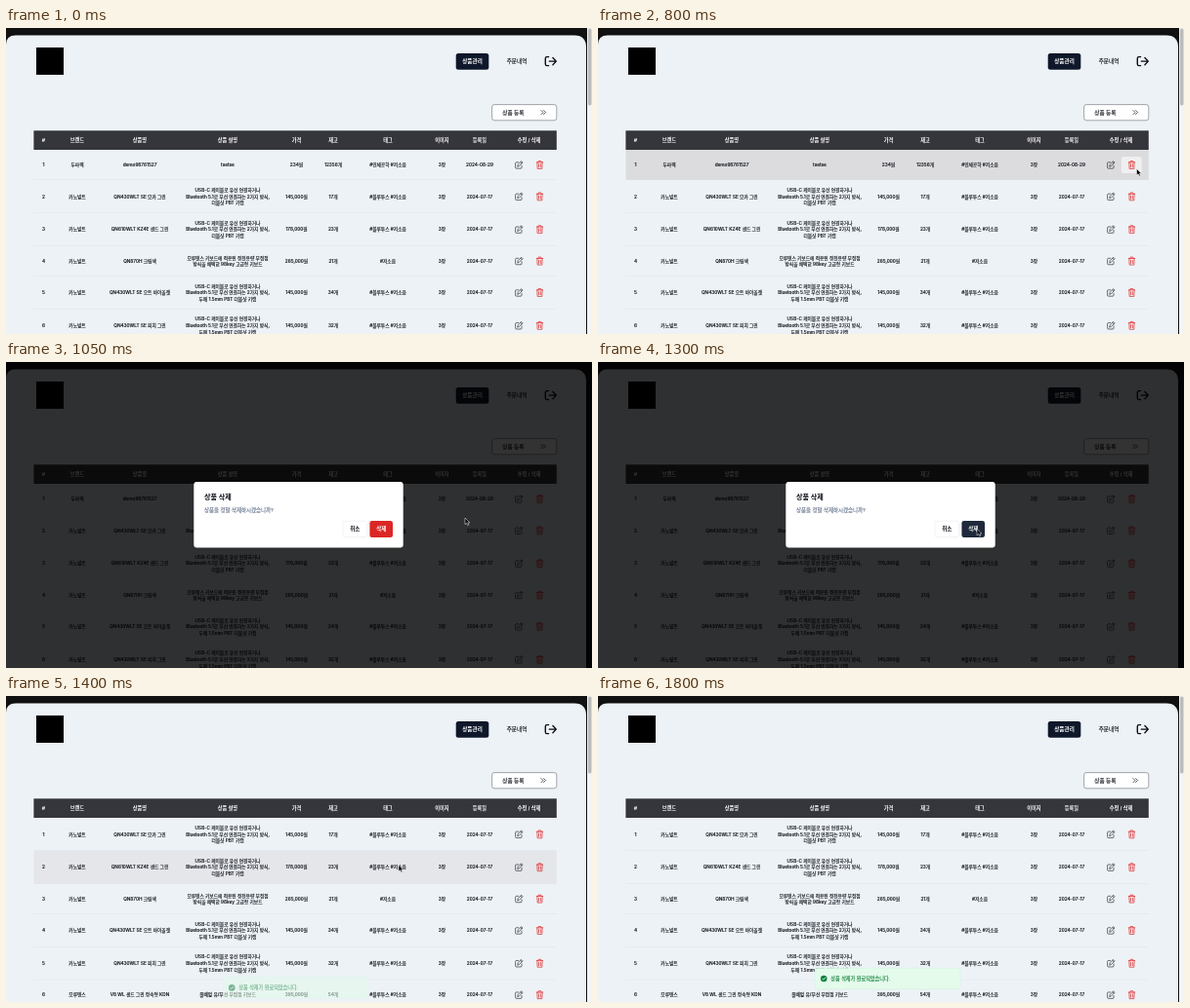
Recreate the animation shown at these times as an HTML page. Size 600 px wide and 314 px high, loop 2100 ms.

```html
<!DOCTYPE html>
<html lang="ko">
<head>
<meta charset="utf-8">
<title>상품관리</title>
<style>
  html, body { margin: 0; width: 100%; height: 100%; overflow: hidden; background: #111; }
  svg { display: block; width: 100%; height: 100%; }
  text { font-family: Inter, "Noto Sans CJK KR", "Noto Sans CJK", sans-serif; white-space: pre; }
</style>
</head>
<body>
<svg id="stage" viewBox="0 0 600 314"></svg>
<script>
const LOOP = 2100, STEP = 50, TOP = 125;
const INK = '#11151c', RED = '#dc2626', NAVY = '#0f172a';

const rect = (x, y, w, h, fill, more = '') =>
  `<rect x="${x}" y="${y}" width="${w}" height="${h}" fill="${fill}" ${more}/>`;
// A hairline stroke gives Hangul a medium weight
const text = (x, y, s, size = 4.74, fill = INK, weight = 500, anchor = 'middle') =>
  `<text x="${x}" y="${y + size * 0.37}" font-size="${size}" fill="${fill}" stroke="${fill}" stroke-width="${weight < 600 ? 0.13 : 0}" font-weight="${weight}" text-anchor="${anchor}">${s}</text>`;
const line = (d, color, width) =>
  `<path d="${d}" fill="none" stroke="${color}" stroke-width="${width}" stroke-linecap="round" stroke-linejoin="round"/>`;
const icon = (x, y, scale, d, color, width) =>
  `<g transform="translate(${x} ${y}) scale(${scale})">${line(d, color, width)}</g>`;

const editIcon = (x, y) => icon(x, y, 0.92,
  'M-.3-3H-2.6Q-3.7-3-3.7-1.9V2.9Q-3.7 4-2.6 4H2.2Q3.3 4 3.3 2.9V.8M-1.3 1.6L-.9-.4L3-4.1L4.4-2.7L.6 1.2ZM2-3.2L3.4-1.8', INK, 0.65);
const trashIcon = (x, y) => icon(x, y, 0.94,
  'M-3.4-2.8H3.4M-1.5-2.9V-4.2H1.5V-2.9M-2.8-2.8L-2.5 4.2H2.5L2.8-2.8M-1-.9V2.5M1-.9V2.5', RED, 0.75);

// Table contents
const columns = [38.5, 73, 137, 227, 297.5, 335, 391, 446.5, 485, 535.5];
const titles = ['#', '브랜드', '상품명', '상품 설명', '가격', '재고', '태그', '이미지', '등록일', '수정 / 삭제'];
const wireless = last => ['USB-C 케이블로 유선 연결하거나', 'Bluetooth 5.1로 무선 연결하는 2가지 방식,', last];
const thinCaps = wireless('더블샷 PBT 키캡'), thickCaps = wireless('두께 1.5mm PBT 더블샷 키캡');
const product = (brand, name, about, price, stock, tags = '#블루투스 #저소음', date = '2024-07-17') =>
  ({ about, height: about.length > 2 ? 33.8 : 31, cells: [brand, name, about, price + '원', stock + '개', tags, '3장', date] });
const products = [
  product('두마렉', 'demo98761527', ['tsetse'], '234', 12356, '#인체공학 #저소음', '2024-08-29'),
  product('카노빌트', 'QN430WLT SE 모카 그린', thinCaps, '145,000', 17),
  product('카노빌트', 'QN610WLT KZ4E 샌드 그린', thinCaps, '178,000', 23),
  product('카노빌트', 'QN870H 크림색', ['모루텐스 키보드에 적용된 정전용량 무접점', '방식을 채택한 98key 고급형 키보드'], '265,000', 21, '#저소음'),
  product('카노빌트', 'QN430WLT SE 오트 바이올렛', thickCaps, '145,000', 34),
  product('카노빌트', 'QN430WLT SE 피치 그린', thickCaps, '145,000', 32),
  product('모루텐스', 'V8 WL 샌드 그린 정숙형 KDN', ['풀배열 유/무선 무접점 키보드'], '395,000', 54),
];

function makeTable(items, id) {
  let y = TOP, svg = '';
  const spans = items.map((item, i) => {
    const mid = y + item.height / 2, span = [y, y + item.height];
    svg += rect(28.4, y, 535.4, item.height, '#dcdcde', `class="hover" opacity="0"`);
    svg += rect(28.4, span[1] - 0.4, 535.4, 0.4, '#d9dfe6');
    if (id === 'before' && !i) svg += rect(535.8, 132, 21, 17, '#efeff0', 'id="trashHover" rx="2.5"');
    [i + 1, ...item.cells].forEach((cell, c) => {
      const lines = [].concat(cell);
      lines.forEach((s, n) => { svg += text(columns[c], mid + (n - (lines.length - 1) / 2) * 6.6, s); });
    });
    svg += editIcon(525, mid) + trashIcon(546.5, mid);
    y = span[1];
    return span;
  });
  return { spans, svg: `<g id="${id}">${svg}</g>` };
}
const before = makeTable(products.slice(0, 6), 'before');
const after = makeTable(products.slice(1), 'after');

const stage = document.getElementById('stage');
stage.innerHTML =
  rect(0, 0, 600, 314, '#111') +
  '<path d="M0 314V17Q0 7.4 10 7.4H582Q594 7.4 594 20V314Z" fill="#edf2f7"/>' +
  rect(31, 20, 28, 28, '#000') +
  rect(460.7, 26.1, 33.6, 16.7, NAVY, 'rx="2.5"') + text(477.5, 34.3, '상품관리', 5.6, '#fff', 700) +
  text(523, 34.3, '주문내역', 5.6) +
  icon(557.8, 34.1, 0.92, 'M-2.4-4.9H-4.3Q-6-4.9-6-3.1V3.1Q-6 4.9-4.3 4.9H-2.4M-1.7 0H5.6M2.3-3.9L6 0L2.3 3.9', '#0b0d12', 1.5) +
  rect(497.6, 78.6, 66.2, 16.2, '#fff', 'rx="2.5" stroke="#4b5058" stroke-width=".5"') +
  text(519.3, 86.6, '상품 등록', 5.6) +
  line('M548 84.6L550 86.6L548 88.6M550.5 84.6L552.5 86.6L550.5 88.6', INK, 0.7) +
  rect(28.4, 105.3, 535.4, 19.7, '#35353c') +
  titles.map((s, i) => text(columns[i], 114.8, s, 5.2, '#fff', 700)).join('') +
  before.svg + after.svg +
  `<g id="scroll">${rect(595, 0, 5, 314, '#f4f4f4')}${rect(596, 0.5, 3.5, 79, '#bbb', 'rx="1.7"')}</g>` +
  rect(0, 0, 600, 314, '#000', 'id="shade"') +
  '<g id="dialog">' +
  rect(192.3, 123, 214.4, 67.6, '#fff', 'rx="3"') +
  text(203, 138.5, '상품 삭제', 7.1, '#0b0f19', 700, 'start') +
  text(203, 152, '상품을 정말 삭제하시겠습니까?', 5.45, '#64748b', 500, 'start') +
  rect(345, 163.2, 24.4, 16.6, '#fff', 'rx="2.3" stroke="#dfe5ec" stroke-width=".5"') + text(357.2, 171.3, '취소', 5.5, INK, 700) +
  rect(372.4, 163, 23.6, 17, RED, 'id="confirm" rx="2.3"') + text(384.2, 171.3, '삭제', 5.5, '#fff', 700) +
  '</g><g id="toast">' +
  rect(222, 279.2, 149, 21.6, '#e4fbeb', 'rx="3" stroke="#c9f5d8" stroke-width=".5"') +
  '<circle cx="231.2" cy="290" r="3.3" fill="#15803d"/>' + line('M229.7 290.1L230.8 291.2L232.8 288.9', '#e4fbeb', 0.8) +
  text(238.3, 289.8, '상품 삭제가 완료되었습니다.', 5.15, '#15803d', 500, 'start') +
  '</g><path id="cursor" d="M0 0V6.6L1.6 5.2L2.7 7.6L3.8 7.1L2.8 4.8H4.8Z" fill="#000" stroke="#fff" stroke-width=".5"/>';

const el = id => document.getElementById(id);
const show = (id, on) => el(id).setAttribute('visibility', on ? 'visible' : 'hidden');

// Linear keyframes: [time, ...values]
function track(keys, t) {
  const i = keys.findIndex(k => k[0] > t);
  if (i < 0) return keys[keys.length - 1].slice(1);
  if (!i) return keys[0].slice(1);
  const a = keys[i - 1], b = keys[i], p = (t - a[0]) / (b[0] - a[0]);
  return a.slice(1).map((v, n) => v + (b[n + 1] - v) * p);
}
const pointer = [[50, 6, 294], [150, 90, 270], [300, 330, 200], [450, 577, 113], [600, 562, 138],
  [700, 551.5, 144.5], [800, 551.5, 144.5], [850, 547.5, 146], [950, 520, 152], [1150, 420, 168],
  [1250, 387.5, 171], [1350, 388.5, 171.5], [1400, 402, 173.5], [1500, 430, 160], [1650, 462, 130], [1750, 470, 114]];
const modal = [[800, 0], [850, 0.93], [900, 1], [1300, 1], [1350, 0.5], [1400, 0]];
const toast = [[1300, 0, 22], [1350, 0.15, 20], [1400, 0.55, 9.4], [1450, 0.92, 2], [1500, 1, 0]];

const pointing = t => t >= 50 && t < 1800;
function isOver(span, t) {
  if (!pointing(t) || (t >= 850 && t < 1390)) return 0;
  const [x, y] = track(pointer, t);
  return +(x > 28 && x < 564 && y >= span[0] && y < span[1]);
}

function draw(t) {
  const deleted = t >= 1400, [x, y] = track(pointer, t), [m] = track(modal, t), [alpha, drop] = track(toast, t);
  show('before', !deleted);
  show('after', deleted);
  const spans = (deleted ? after : before).spans;
  el(deleted ? 'after' : 'before').querySelectorAll('.hover').forEach((row, i) =>
    row.setAttribute('opacity', (isOver(spans[i], t) + isOver(spans[i], t - 40)) / 2));
  show('trashHover', t < 850 && x > 535.8 && x < 557 && y > 132 && y < 149);

  show('scroll', m === 0);
  el('shade').setAttribute('opacity', 0.8 * m);
  const size = 0.94 + 0.06 * m;
  el('dialog').setAttribute('opacity', m);
  el('dialog').setAttribute('transform', `translate(299.5 157) scale(${size}) translate(-299.5 -157)`);
  el('confirm').setAttribute('fill', x > 372 && x < 396 && y > 163 ? '#1e293b' : RED);
  el('toast').setAttribute('opacity', alpha);
  el('toast').setAttribute('transform', `translate(0 ${drop})`);
  show('cursor', pointing(t));
  el('cursor').setAttribute('transform', `translate(${x} ${y})`);
}

const start = performance.now();
function tick() {
  const t = (performance.now() - start) % LOOP;
  draw(Math.floor(t / STEP) * STEP);
  requestAnimationFrame(tick);
}
tick();
</script>
</body>
</html>
```
